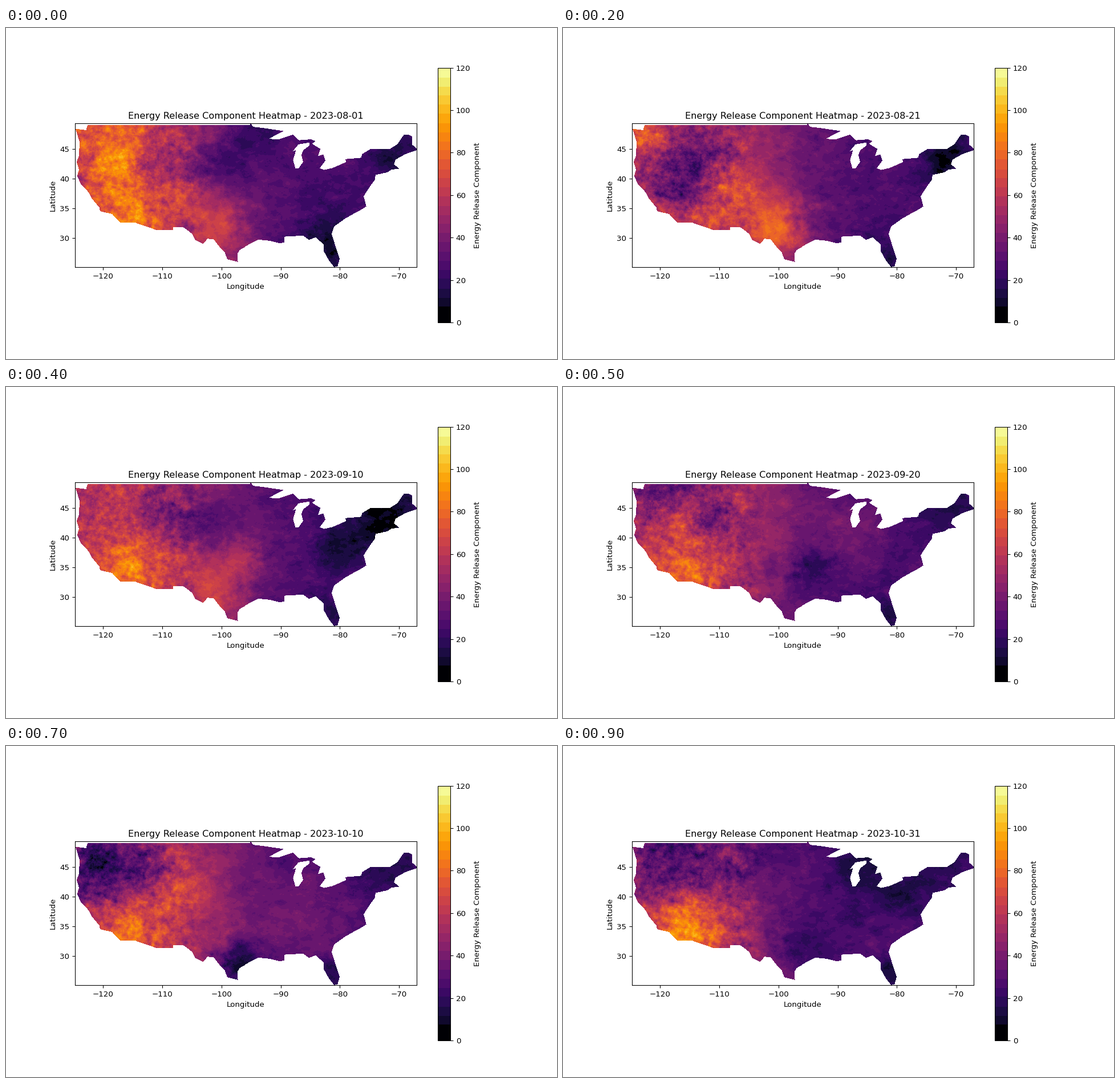
These frames come from a looping animation (966x580 px, 1000 ms). A matplotlib script:

```python
import numpy as np
import matplotlib.pyplot as plt
from matplotlib.animation import FuncAnimation
from matplotlib.colors import ListedColormap
from matplotlib.path import Path

DPI, FRAMES, INTERVAL = 96.6, 10, 100
NX, NY = 600, 253
WEST, EAST, SOUTH, NORTH = -124.767, -67.058, 25.067, 49.4

# Key points (lon, lat) of the outline, counter-clockwise from the north-west.
PACIFIC = [
    (-122.65, 49), (-122.9, 48.15), (-124.7, 48.38), (-124, 46.2), (-124.1, 43.8),
    (-124.5, 42.8), (-124.1, 41.5), (-124.4, 40.4), (-123.75, 39), (-122.5, 37.7),
    (-121.9, 36.6), (-120.65, 35.1), (-120.55, 34.5), (-118.5, 34), (-117.13, 32.53)]
SOUTH_BORDER = [
    (-114.75, 32.6), (-111.07, 31.33), (-108.2, 31.33), (-108.2, 31.78), (-106.4, 31.75),
    (-105, 30.65), (-104.5, 29.65), (-103.2, 28.98), (-102.4, 29.85), (-101.4, 29.77),
    (-100.5, 28.6), (-99.5, 27.5), (-99.1, 26.4), (-97.3, 25.95)]
GULF = [
    (-97.4, 27.3), (-97, 27.95), (-95, 29.1), (-93.8, 29.7), (-91.8, 29.5),
    (-90.2, 29.1), (-89.4, 29.2), (-89.4, 30.2), (-86.2, 30.38), (-85.2, 29.65),
    (-84.1, 30.1), (-82.75, 28.9), (-82.7, 27.7), (-81.8, 26.1), (-81, 25.1), (-80.4, 25.15)]
ATLANTIC = [
    (-80.05, 26.5), (-81.4, 30.6), (-81, 31.9), (-79.2, 33.2), (-77.9, 33.95),
    (-76.5, 34.7), (-75.55, 35.3), (-76, 37), (-75.05, 38.5), (-74.1, 39.8),
    (-74, 40.6), (-72, 41.05), (-71.3, 41.5), (-70, 41.65), (-70.9, 42.4),
    (-70.6, 43.2), (-69, 44.1), (-67, 44.8)]
NORTH_BORDER = [
    (-67.1, 45.1), (-67.8, 45.7), (-67.8, 47.07), (-68.4, 47.36), (-69.2, 47.4),
    (-70.3, 45.8), (-71.5, 45.02), (-74.8, 45), (-76.3, 44.1), (-76.4, 43.5),
    (-79.05, 43.27), (-79, 42.75), (-81.3, 41.75), (-82.7, 41.45), (-83.4, 41.75),
    (-82.45, 43), (-82.8, 44.05), (-83.7, 43.8), (-83.3, 45), (-84.7, 45.85),
    (-84.1, 46.3), (-84.9, 46.6), (-86.9, 46.45), (-87.9, 47.4), (-90.4, 46.57),
    (-92, 46.7), (-89.5, 48), (-92.8, 48.5), (-94.6, 48.7), (-95.15, 49.4), (-95.15, 49)]
LAKE = [
    (-85.1, 45.6), (-86.2, 44.75), (-86.5, 44), (-86.2, 42.8), (-87, 41.7), (-87.5, 41.7),
    (-87.9, 43.1), (-87.4, 44.8), (-87.95, 44.6), (-87, 45.75), (-85.2, 46.05)]

# Weather systems by animation step: lon, lat, radius in degrees, change.
CLIMATE = [(-115.5, 35, 6, 30), (-101, 32, 5, 20), (-72, 44.5, 5, -12), (-81, 27, 3, -14)]
WEATHER = {
    0: [(-118, 45, 7, 34), (-112, 42, 3, -20), (-106.5, 37.5, 3, 15),
        (-101, 42, 5, -22), (-95, 47, 5, -13), (-82, 31.5, 4, -15)],
    1: [(-114, 47, 9, 9), (-119, 40.5, 3, 12), (-109.3, 33.8, 2, -42),
        (-98, 31.5, 6, 12), (-87, 38, 7, -9), (-85, 35.5, 3.5, -8)],
    2: [(-121.5, 47, 4, 24), (-115.5, 41.5, 6, -34), (-116, 36, 4, -28),
        (-107.5, 39, 3.5, 26), (-100, 32, 5, 16), (-73, 43, 3, -8)],
    4: [(-119, 46, 5, 12), (-110, 44.5, 4, -14), (-102, 42.5, 5, -20),
        (-96.5, 37, 3.5, 18), (-74, 43.5, 6, -12), (-80, 38, 4, -16)],
    5: [(-119, 47.5, 6, -18), (-117, 43.5, 3, 18), (-111, 43, 3, -18),
        (-100, 31.5, 6, -24), (-94.5, 35.5, 3, -14), (-88, 40.5, 5, 12)],
    7: [(-121, 45, 7, -32), (-114, 45, 5, -14), (-107, 41, 4, 20),
        (-97.5, 28.5, 4, -32), (-101, 32, 5, -14), (-86, 37, 8, 10)],
    9: [(-117, 46, 8, -26), (-102, 47, 7, -20), (-115, 36, 5, 12),
        (-99, 32, 6, -32), (-86, 45, 6, -14), (-79, 40.5, 3, -12)],
}


def noise(seed, beta, stretch=1.0, reach=40):
    """Unit-variance random field with a power-law spectrum."""
    white = np.random.default_rng(seed).standard_normal((NY, NX))
    fx, fy = np.fft.rfftfreq(NX) * stretch, np.fft.fftfreq(NY)[:, None]
    spectrum = np.fft.rfft2(white) / (fx**2 + fy**2 + reach**-2) ** (beta / 2)
    field = np.fft.irfft2(spectrum, s=(NY, NX))
    return (field - field.mean()) / field.std()


def inside(outline):
    grid = np.column_stack([lon.ravel(), lat.ravel()])
    return Path(outline + outline[:1]).contains_points(grid).reshape(NY, NX)


def rise_west(edge, width):
    return 1 / (1 + np.exp((warped_lon - edge) / width))


def bumps(systems):
    return sum(change * np.exp(-((warped_lon - x)**2 + (warped_lat - y)**2) / radius**2)
               for x, y, radius, change in systems)


lon, lat = np.meshgrid(
    WEST + (np.arange(NX) + 0.5) * (EAST - WEST) / NX,
    NORTH - (np.arange(NY) + 0.5) * (NORTH - SOUTH) / NY)
land = inside(PACIFIC + SOUTH_BORDER + GULF + ATLANTIC + NORTH_BORDER) & ~inside(LAKE)
warped_lon = lon + 0.6 * noise(2, 1.8)
warped_lat = lat + 0.4 * noise(3, 1.8)
rugged = rise_west(-104, 0.9)
climate = 27 + 25 * rise_west(-97, 3) + bumps(CLIMATE) + 4.5 * rugged * noise(1, 1.8, reach=25)


def field(step):
    """Component on land; steps between known systems blend their neighbours."""
    known = sorted(WEATHER)
    before = max(k for k in known if k <= step)
    after = min(k for k in known if k >= step)
    blend = (step - before) / max(after - before, 1)
    change = (1 - blend) * bumps(WEATHER[before]) + blend * bumps(WEATHER[after])
    gusts = (2.2 + 1.5 * rugged) * noise(20 + step, 1.8, stretch=1.5)
    return np.where(land, np.clip(climate + change + gusts, 2, 112), np.nan)


def banded_inferno():
    edges = np.append(0, np.linspace(7.3, 120, 27))
    centers = (edges[:-1] + edges[1:]) / 2
    centers[0] = 0
    band = np.digitize(np.linspace(0, 119.9, 256), edges) - 1
    return ListedColormap(plt.get_cmap("inferno")(centers[band] / 120))


def title(step):
    day = np.datetime64("2023-08-01") + int(91 * step / (FRAMES - 1))
    return f"Energy Release Component Heatmap - {day}"


fig, ax = plt.subplots(figsize=(966 / DPI, 580 / DPI), dpi=DPI)
heatmap = ax.imshow(field(0), cmap=banded_inferno(), vmin=0, vmax=120,
                    extent=(WEST, EAST, SOUTH, NORTH), interpolation="nearest")
fig.colorbar(heatmap, ax=ax, label="Energy Release Component")
ax.set_xlabel("Longitude")
ax.set_ylabel("Latitude")
ax.set_title(title(0))


def update(step):
    heatmap.set_data(field(step))
    ax.set_title(title(step))
    return [heatmap, ax.title]


animation = FuncAnimation(fig, update, frames=FRAMES, interval=INTERVAL,
                          repeat=True, repeat_delay=0, blit=False)
plt.show()
```
